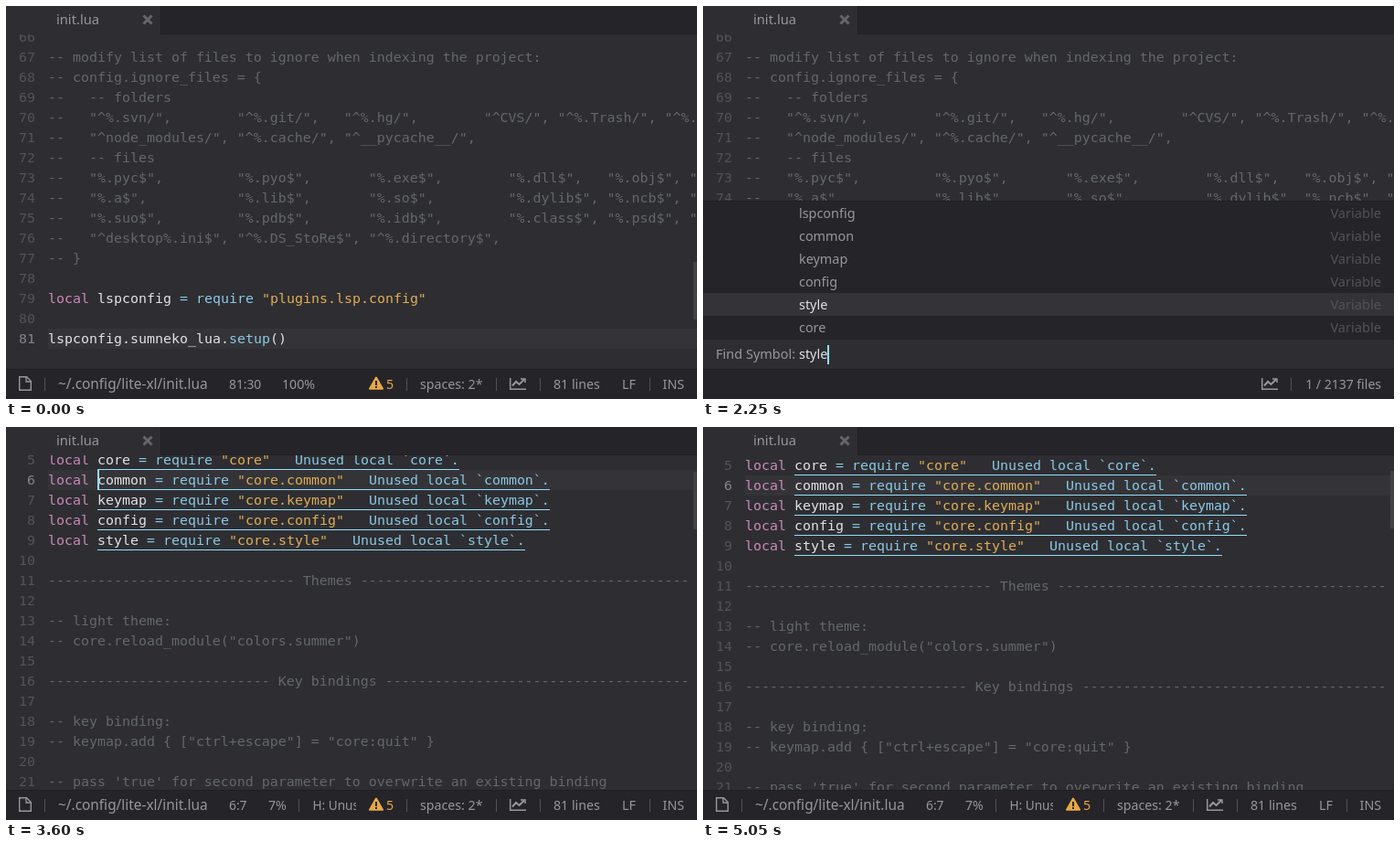
An HTML page with a canvas for the animation above (5.1 s loop, 756 by 430 pixels).

```html
<!DOCTYPE html>
<html lang="en">
<head>
<meta charset="utf-8">
<title>Find symbol</title>
<style>
html, body { margin: 0; width: 100%; height: 100%; overflow: hidden; background: #2e2e32; }
canvas { display: block; }
</style>
</head>
<body>
<canvas id="stage" width="756" height="430"></canvas>
<script>
const g = document.getElementById('stage').getContext('2d');
const W = 756, LOOP = 5100, STEP = 50;
const TOP = 31, BOTTOM = 397, LINE = 22, COL = 9, TEXT_X = 46;
const OPEN = 930, CLOSE = 3350, JUMP = 1350;
const MONO = '14.95px "DejaVu Sans Mono", "Noto Sans Mono", monospace';
const C = {
  bg: '#2e2e32', bg2: '#252529', divider: '#202024', text: '#97979c', accent: '#e1e1e6',
  dim: '#525257', highlight: '#343438', scrollbar: '#414146', caret: '#93ddfa',
  number: '#525259', number2: '#83838f', comment: '#63676b', keyword: '#cb88b8',
  string: '#e0ad55', blue: '#8ac8e4', warn: '#e8a845'
};

const rule = (left, title, right) => '-'.repeat(left) + ` ${title} ` + '-'.repeat(right);
const names = ['core', 'common', 'keymap', 'config', 'style'];
const lines = [];
const put = (first, text) => text.split('\n').forEach((s, i) => lines[first + i] = s);

names.forEach((n, i) => put(5 + i, `local ${n} = require "${i ? 'core.' : ''}${n}"`));
put(11, rule(30, 'Themes', 40) + `

-- light theme:
-- core.reload_module("colors.summer")

` + rule(27, 'Key bindings', 37) + `

-- key binding:
-- keymap.add { ["ctrl+escape"] = "core:quit" }

-- pass 'true' for second parameter to overwrite an existing binding
-- keymap.add({ ["ctrl+pageup"] = "root:switch-to-previous-tab" }, true)
-- keymap.add({ ["ctrl+pagedown"] = "root:switch-to-next-tab" }, true)

` + rule(31, 'Fonts', 40) + `

-- customize fonts:
-- style.font = renderer.font.load(DATADIR .. "/fonts/FiraSans-Regular.ttf", 14 * SCALE)
-- style.code_font = renderer.font.load(DATADIR .. "/fonts/JetBrainsMono-Regular.ttf", 14 * SCALE)
--
-- DATADIR is the location of the installed Lite XL Lua code, default color
-- schemes and fonts.
-- USERDIR is the location of the Lite XL configuration directory.
--
-- font names used by lite:
-- style.font          : user interface
-- style.big_font      : big text in welcome screen
-- style.icon_font     : icons
-- style.icon_big_font : toolbar icons
-- style.code_font     : code
--
-- the function to load the font accept a 3rd optional argument like:
--
-- {antialiasing="grayscale", hinting="full"}
--
-- possible values are:
-- antialiasing: grayscale, subpixel
-- hinting: none, slight, full`);
put(67, `-- modify list of files to ignore when indexing the project:
-- config.ignore_files = {
--   -- folders
--   "^%.svn/",        "^%.git/",   "^%.hg/",        "^CVS/", "^%.Trash/", "^%.Trash%-.*/",
--   "^node_modules/", "^%.cache/", "^__pycache__/",
--   -- files
--   "%.pyc$",         "%.pyo$",       "%.exe$",        "%.dll$",   "%.obj$", "%.o$",
--   "%.a$",           "%.lib$",       "%.so$",         "%.dylib$", "%.ncb$", "%.sdf$",
--   "%.suo$",         "%.pdb$",       "%.idb$",        "%.class$", "%.psd$", "%.db$",
--   "^desktop%.ini$", "^%.DS_StoRe$", "^%.directory$",
-- }

local lspconfig = require "plugins.lsp.config"

lspconfig.sumneko_lua.setup()`);

const rect = (x, y, w, h, color) => { g.fillStyle = color; g.fillRect(x, y, w, h); };
const decay = (t, rate) => Math.pow(1 - rate, t * 60 / 1000);

function clip(x, y, w, h, draw) {
  g.save();
  g.beginPath();
  g.rect(x, y, w, h);
  g.clip();
  draw();
  g.restore();
}

function label(s, x, y, color = C.text, size = 14.2, align = 'left') {
  g.font = size + 'px "Noto Sans", "Open Sans", sans-serif';
  g.textAlign = align;
  g.fillStyle = color;
  g.fillText(s, x, y);
  return g.measureText(s).width;
}

function stroke(points, color, width) {
  g.strokeStyle = color;
  g.lineWidth = width;
  g.beginPath();
  points.forEach(([x, y]) => g.lineTo(x, y));
  g.stroke();
}

function mono(s, col, y, color) {
  g.fillStyle = color;
  g.fillText(s, TEXT_X + col * COL, y);
}

function drawCode(s, y) {
  const token = /(--.*)|("[^"]*")|(\blocal\b)|(\brequire\b|\bsetup\b|=)|[^\s"=]+?(?=\b|\s|$)/g;
  for (const m of s.matchAll(token)) {
    const color = m[1] ? C.comment : m[2] ? C.string : m[3] ? C.keyword : m[4] ? C.blue : C.accent;
    mono(m[0], m.index, y, color);
  }
}

// Caret blinking restarts at each of these times.
const blinks = [550, 1500, 2000, 2550, 2800, 3100, 3400];
function caretOn(t) {
  const start = blinks.filter(b => b <= t).pop();
  return start !== undefined && (t - start) % 1000 < 500;
}

function drawDoc(t, bottom, active) {
  const jumped = t >= CLOSE + STEP;
  const shift = jumped ? JUMP * (1 - decay(t - CLOSE, 0.3)) : 0;
  const lineTop = n => Math.round(353 + (n - 81) * LINE + shift);
  const current = jumped ? 6 : 81;
  clip(0, TOP, W, bottom - TOP, () => {
    if (active) rect(TEXT_X, lineTop(current), W - TEXT_X, LINE, C.highlight);
    for (let n = 5; n <= 81; n++) {
      const y = lineTop(n), base = y + 16;
      if (y < TOP - LINE || y > bottom) continue;
      g.font = MONO;
      g.textAlign = 'right';
      g.fillStyle = n === current ? C.number2 : C.number;
      g.fillText(n, 32, base);
      g.textAlign = 'left';
      const s = lines[n] || '';
      drawCode(s, base);
      if (n <= 9) {
        const note = `Unused local \`${names[n - 5]}\`.`;
        const col = s.length + 3;
        mono(note, col, base, C.blue);
        rect(100, y + 21, (col + note.length - 6) * COL, 1, C.caret);
      }
    }
    if (active && caretOn(t)) {
      rect(TEXT_X + (jumped ? 6 : 29) * COL, lineTop(current), 2, LINE, C.caret);
    }
    const h = bottom - TOP, total = 1760 + h;
    rect(752, Math.round(TOP + (1446 - shift) * h / total), 4, Math.round(h * h / total), C.scrollbar);
  });
}

const symbols = ['core', 'style', 'config', 'keymap', 'common', 'lspconfig'];
const picks = [2000, 2550, 2800, 3100];

function drawCommand(t, open, y, active) {
  const height = Math.round(151 * open);
  const pick = picks.filter(p => p <= t).length;
  clip(0, y - height, W, height, () => {
    rect(0, y - height, W, height, C.bg2);
    if (active) {
      const pos = pick ? pick - decay(t - picks[pick - 1] + 20, 0.5) : 0;
      rect(0, Math.round(y - 25 * (pos + 1)), W, 25, C.highlight);
      symbols.forEach((s, i) => {
        const base = y - 25 * i - 7;
        label(s, 105, base, i === pick ? C.accent : C.text, 14.4);
        label('Variable', 742, base, C.dim, 14.6, 'right');
      });
    }
    rect(0, y - height, W, 1, C.divider);
  });
  clip(0, y, W, BOTTOM - y, () => {
    rect(0, y, W, BOTTOM - y, C.bg);
    rect(0, y, W, 1, C.divider);
    if (!active) return;
    const glow = decay(t - OPEN, 0.1);
    const mix = (a, b) => Math.round(a + (b - a) * glow);
    const base = y + 22 - (t < 1100 ? 1 : 0);
    label('Find Symbol:', 14, base, `rgb(${mix(151, 225)},${mix(151, 225)},${mix(156, 230)})`, 14.5);
    const w = pick ? label(symbols[pick], 105, base, C.accent, 14.4) : 0;
    if (caretOn(t)) rect(Math.round(105 + w), y + 7, 2, 21, C.caret);
  });
}

function drawTabs() {
  rect(0, 0, W, TOP, C.bg2);
  rect(0, TOP - 1, W, 1, C.divider);
  rect(0, 0, 169, TOP, C.bg);
  rect(169, 0, 1, TOP, C.divider);
  label('init.lua', 55, 20, C.text, 14.7);
  stroke([[150.5, 10.5], [159.5, 19.5]], '#66666a', 3);
  stroke([[159.5, 10.5], [150.5, 19.5]], '#66666a', 3);
}

function chart(x) {
  stroke([[x + 3, 415.5], [x + 7, 411], [x + 10.5, 414], [x + 16, 408.5]], C.text, 2);
  stroke([[x + 12, 408], [x + 17, 408], [x + 17, 412]], C.text, 1.5);
  stroke([[x + 0.7, 407], [x + 0.7, 419.2], [x + 18, 419.2]], C.text, 1.5);
}

function drawStatus(t, command) {
  rect(0, BOTTOM, W, 33, C.bg2);
  rect(0, BOTTOM, W, 1, C.divider);
  const y = 419;
  const bar = x => rect(x, 407, 1, 14, C.dim);
  if (command) {
    chart(611);
    bar(643);
    label('1 / 2137 files', 742, y, C.text, 14, 'right');
    return;
  }
  const jumped = t >= CLOSE;
  stroke([[14.7, 405.7], [22.5, 405.7], [27.3, 410.5], [27.3, 420.3], [14.7, 420.3], [14.7, 405]], C.text, 1.4);
  stroke([[22, 406], [22, 411], [27, 411]], C.text, 1.3);
  [42, 438, 536, 584, 704].forEach(bar);
  label('~/.config/lite-xl/init.lua', 57, y, C.text, 15.4);
  label(jumped ? '6:7' : '81:30', 244, y, C.text, 13.8);
  label(jumped ? '7%' : '100%', jumped ? 287 : 302, y);
  if (jumped) {
    bar(320);
    clip(336, 400, 47, 30, () => label('H: Unused local', 335.5, y, C.text, 13.6));
  }
  g.fillStyle = g.strokeStyle = C.warn;
  g.lineJoin = 'round';
  g.lineWidth = 2;
  g.beginPath();
  g.moveTo(405, 406.5);
  g.lineTo(412, 418.8);
  g.lineTo(398, 418.8);
  g.closePath();
  g.fill();
  g.stroke();
  g.lineJoin = 'miter';
  rect(404, 410, 2, 5, C.bg2);
  rect(404, 416, 2, 2, C.bg2);
  label('5', 416, y, C.warn);
  label('spaces: 2*', 453, y);
  chart(551);
  label('81 lines', 599, y);
  label('LF', 674, y);
  label('INS', 742, y, C.text, 14.2, 'right');
}

function draw(t) {
  const command = t >= OPEN && t < CLOSE + STEP;
  const open = t < OPEN ? 0 : t < CLOSE + STEP ? 1 - decay(t - OPEN, 0.5) : decay(t - CLOSE, 0.5);
  const y = Math.round(BOTTOM - 33 * open);
  rect(0, 0, W, 430, C.bg);
  drawDoc(t, y, !command);
  if (y < BOTTOM) drawCommand(t, open, y, command);
  drawTabs();
  drawStatus(t, command);
}

const begin = performance.now();
function frame() {
  const t = (performance.now() - begin) % LOOP;
  draw(Math.floor(t / STEP) * STEP);
  requestAnimationFrame(frame);
}
frame();
</script>
</body>
</html>
```
